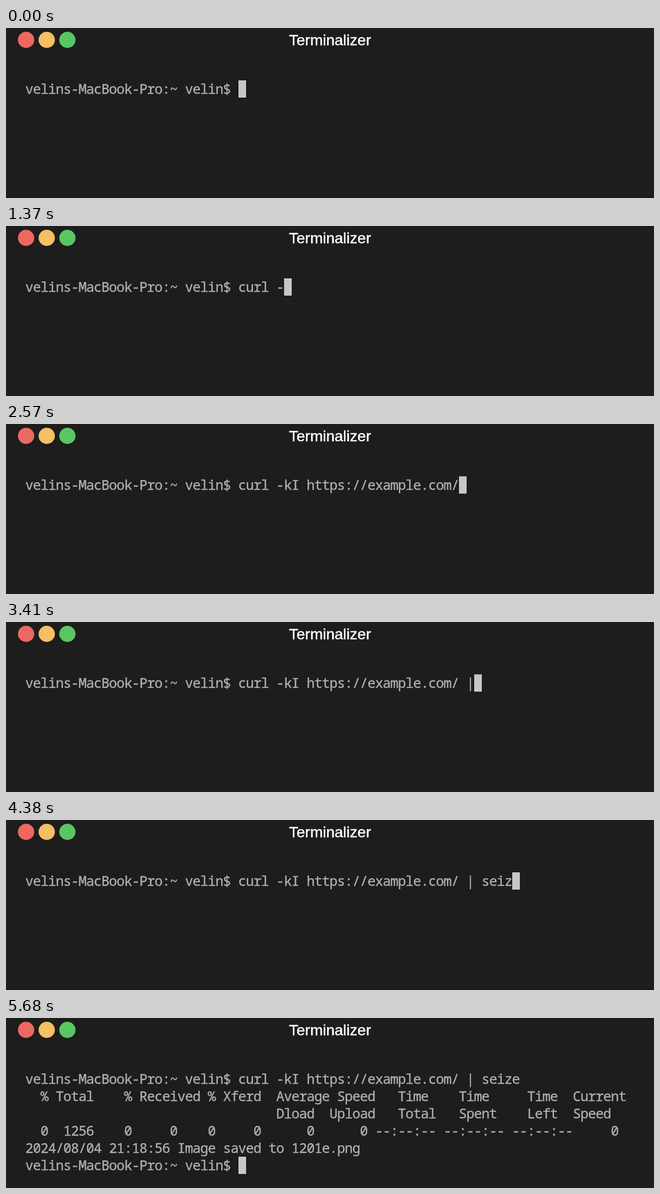
An HTML page for the animation above (7450 ms loop, 1193 px wide and 315 px high).

```html
<!DOCTYPE html>
<html lang="en">
<head>
<meta charset="utf-8">
<title>Terminalizer</title>
<style>
  html, body { margin: 0; width: 100%; height: 100%; overflow: hidden; background: #1d1d1d; }
  #window { position: relative; width: 1193px; height: 315px; overflow: hidden; }
  .dot { position: absolute; top: 7px; width: 30px; height: 30px; border-radius: 50%; }
  h1 {
    position: absolute; top: 7px; width: 100%; margin: 0; text-align: center; color: #fff;
    font: 28px/32px "Liberation Sans", Arial, sans-serif;
    -webkit-text-stroke: 0.5px;
  }
  pre {
    position: absolute; left: 35.5px; top: 96px; margin: 0; color: #afafaf;
    font: 25px/32px "Noto Sans Mono", monospace;
    letter-spacing: calc(14px - 1ch); font-variant-ligatures: none;
    -webkit-text-stroke: 0.4px;
  }
  #cursor { position: absolute; width: 14px; height: 32px; background: #c7c7c7; }
</style>
</head>
<body>
<div id="window">
  <div class="dot" style="left: 22px; background: #ed6860"></div>
  <div class="dot" style="left: 60px; background: #f5bf63"></div>
  <div class="dot" style="left: 98px; background: #5ac663"></div>
  <h1>Terminalizer</h1>
  <pre id="screen"></pre>
  <div id="cursor"></div>
</div>
<script>
const LOOP = 7450;
const PROMPT = 'velins-MacBook-Pro:~ velin$ ';
const HEADER =
  '  % Total    % Received % Xferd  Average Speed   Time    Time     Time  Current\n' +
  ' '.repeat(33) + 'Dload  Upload   Total   Spent    Left  Speed\n';
const progress = total =>
  '  0' + String(total).padStart(6) +
  '    0     0    0     0      0      0 --:--:-- --:--:-- --:--:--     0';

// Each step appends text; '\r' rewrites the current line.
const steps = [
  [0, PROMPT],
  [690, 'c'], [830, 'u'], [920, 'r'], [1070, 'l'], [1190, ' '],
  [1370, '-'], [1710, 'k'], [2090, 'I'], [2320, ' '],
  [2570, 'https://example.com/'], [2940, ' '], [3410, '|'], [3560, ' '],
  [3920, 's'], [4160, 'e'], [4270, 'i'], [4380, 'z'], [4590, 'e'],
  [4660, '\n'],
  [4720, HEADER + progress(0)],
  [5640, '\r' + progress(1256) + '\n'],
  [5680, '2024/08/04 21:18:56 Image saved to 1201e.png\n' + PROMPT]
];

const screenEl = document.getElementById('screen');
const cursorEl = document.getElementById('cursor');

function draw(now) {
  const time = now % LOOP;
  const text = steps.filter(([at]) => at <= time).map(([, s]) => s).join('')
    .replace(/[^\n]*\r/g, '');
  if (screenEl.textContent !== text) {
    const lines = text.split('\n');
    screenEl.textContent = text;
    cursorEl.style.left = 36 + 14 * lines.at(-1).length + 'px';
    cursorEl.style.top = 97 + 32 * (lines.length - 1) + 'px';
  }
}

const start = performance.now();
function tick() {
  draw(performance.now() - start);
  requestAnimationFrame(tick);
}
tick();
</script>
</body>
</html>
```
